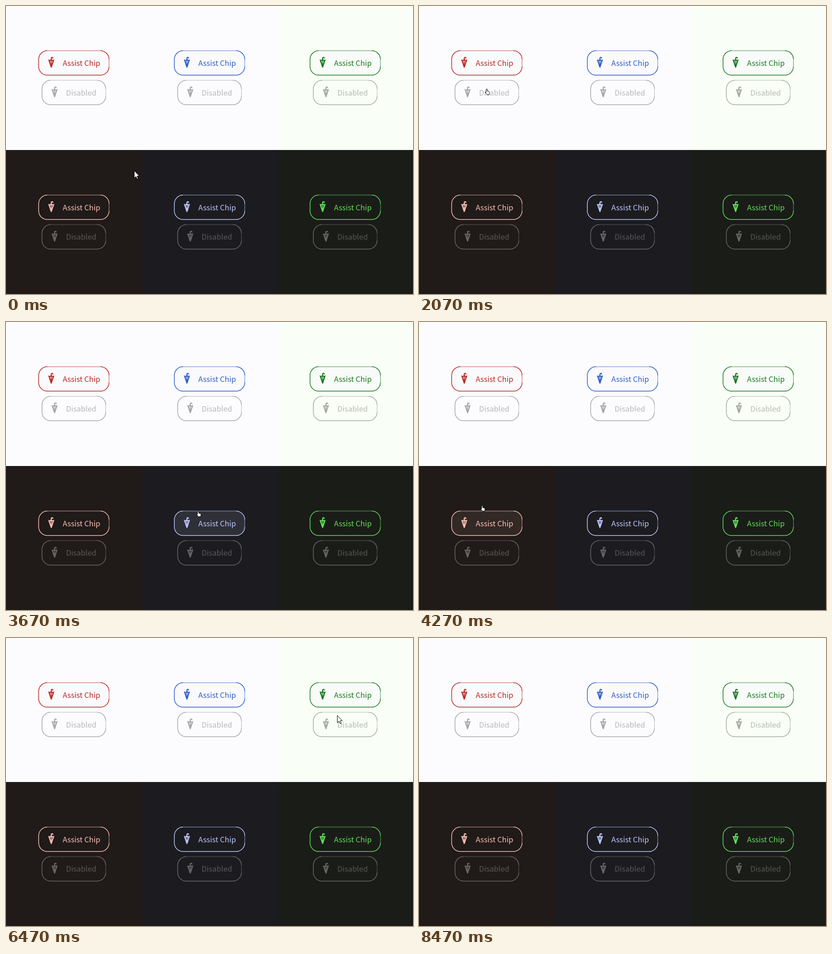
Recreate the animation shown at these times as an HTML page. Size 890 by 630 pixels, loop 9.54 s.

```html
<!DOCTYPE html>
<html lang="en">
<head>
<meta charset="utf-8">
<title>Assist chips</title>
<style>
html, body { margin: 0; width: 100%; height: 100%; overflow: hidden; }
svg { display: block; }
text { font: 16.35px "Noto Sans CJK SC", "Noto Sans CJK JP", "Source Sans 3", "Open Sans", sans-serif; }
</style>
</head>
<body>
<svg id="stage" width="890" height="630" viewBox="0 0 890 630"></svg>
<script>
const LOOP = 9540, FADE = 130;
const stage = document.getElementById('stage');

// Panel: background, accent, hover fill, hover window in ms
const panels = [
  { bg: '#fcfcff', ink: '#b92b24', hover: '#f5e9ed', on: [270, 1330] },
  { bg: '#fcfcff', ink: '#315fc6', hover: '#e9eefa', on: [7330, 7700] },
  { bg: '#f9fff6', ink: '#1b7a22', hover: '#e7f4e5', on: [6530, 6930] },
  { bg: '#201a19', ink: '#f8bfb2', hover: '#322826', on: [3870, 4330] },
  { bg: '#1c1b20', ink: '#bcc6f8', hover: '#2f2f38', on: [3400, 3800] },
  { bg: '#1a1c18', ink: '#62dd58', hover: '#263022', on: [5800, 5930] }
];

// Cursor moves: start and end in ms, then where it comes to rest
const home = { x: 280, y: 360 };
const moves = [
  [0, 330, 181, 122], [470, 670, 161, 110], [1200, 1600, 166, 214], [1600, 1930, 166, 200],
  [2000, 2070, 143, 180], [2600, 3200, 535, 320], [3200, 3400, 500, 425], [3400, 3670, 415, 413],
  [3670, 3930, 205, 428], [3930, 4270, 133, 401], [4270, 4470, 146, 491], [4470, 4600, 135, 434],
  [4600, 4870, 171, 514], [4870, 4930, 160, 510], [5200, 5600, 664, 467], [5730, 6470, 724, 168],
  [6470, 6730, 752, 83], [6800, 7530, 450, 120], [7600, 8130, 166, 300], [8130, 8470, 190, 640]
];
const handOn = [...panels.map(p => p.on), [2060, 2660]];

const umbrella = 'M14.5 6.9 13 5.8V3.9C13 2.7 14.3 2.7 14.3 3.9V4h2C16.3 0 11 0 11 3.9V5.8' +
  'L9.5 6.9 6 6.1 11 21.3Q12 22.7 13 21.3L18 6.1ZM9.6 9 11.2 8.3V15ZM14.4 9 12.8 8.3V15Z';

function chip(cx, y, w, label, ink, [line, icon, word], fill) {
  const h = 53.5, r = 19;
  const arc = (dx, dy) => `a${r} ${r} 0 0 1 ${dx} ${dy}`;
  return `<g transform="translate(${cx - w / 2} ${y})" fill="${ink}">${fill}
    <g fill="none" stroke="${ink}" stroke-width="1.5" stroke-opacity="${line}">
      <path d="M${w - r} 0${arc(r, r)}M${w} ${h - r}${arc(-r, r)}H${r}${arc(-r, -r)}V${r}${arc(r, -r)}"/>
      <path d="M${r} 0H${w - r}M${w} ${r}V${h - r}" opacity=".55"/>
    </g>
    <path d="${umbrella}" fill-rule="evenodd" opacity="${icon}" transform="translate(14 12.4) scale(1.13)"/>
    <text x="52.5" y="33.2" opacity="${word}">${label}</text></g>`;
}

stage.innerHTML = panels.map((p, i) => {
  const col = i % 3, dark = i > 2, cx = 148.4 + col * 296.7, top = dark ? 413.6 : 97.8;
  const x = col * 298, y = dark ? 315 : 0;
  const box = (fill, more) => `<rect width="154" height="53.5" rx="19" fill="${fill}" ${more}/>`;
  const fill = (dark ? '' : box('#f5f5fa', 'opacity=".45"')) +
    box(p.hover, 'class="hover"') + (i ? '' : box(p.ink, 'id="press"'));
  return `<rect x="${x}" y="${y}" width="${890 - x}" height="315" fill="${p.bg}"/>` +
    chip(cx, top, 154, 'Assist Chip', p.ink, [1, 1, 1], fill) +
    chip(cx, top + 64.7, 139.5, 'Disabled', dark ? '#e5e1e2' : '#1b1b1f', [.38, .38, .3], '');
}).join('') + `<g id="cursor" fill="#fff" stroke="#000" stroke-linejoin="round">
  <path d="M.5.5V16.5L4 13 7 18.5 9 17.5 6.5 12H11.5Z"/>
  <path d="M4 .5Q5.5.5 5.5 2V5L9 6Q11 7 10 10L9.5 12.8H4.6L1 8Q.5 6 3 7.5V2Q3 .5 4 .5Z"/></g>`;

const hovers = [...stage.querySelectorAll('.hover')];
const press = document.getElementById('press');
const cursor = document.getElementById('cursor');
const [arrow, hand] = cursor.children;
const clamp = v => Math.max(0, Math.min(1, v));
const level = (t, [from, to]) => clamp((t - from) / FADE) * clamp((to - t) / FADE + 1);

function cursorAt(t) {
  let { x, y } = home;
  for (const [from, to, toX, toY] of moves) {
    const f = clamp((t - from) / (to - from));
    x += (toX - x) * f;
    y += (toY - y) * f;
  }
  return `translate(${Math.round(x)} ${Math.round(y)})`;
}

function draw(now) {
  // The picture advances at fifteen steps a second
  const t = Math.floor((now % LOOP + 5) * .015) / .015;
  const isHand = handOn.some(([from, to]) => t >= from && t < to);
  cursor.setAttribute('transform', cursorAt(t));
  arrow.style.display = isHand ? 'none' : '';
  hand.style.display = isHand ? '' : 'none';
  panels.forEach((p, i) => { hovers[i].style.opacity = level(t, p.on); });
  press.style.opacity = .08 * level(t, [870, 1000]);
  requestAnimationFrame(draw);
}
requestAnimationFrame(draw);
</script>
</body>
</html>
```
